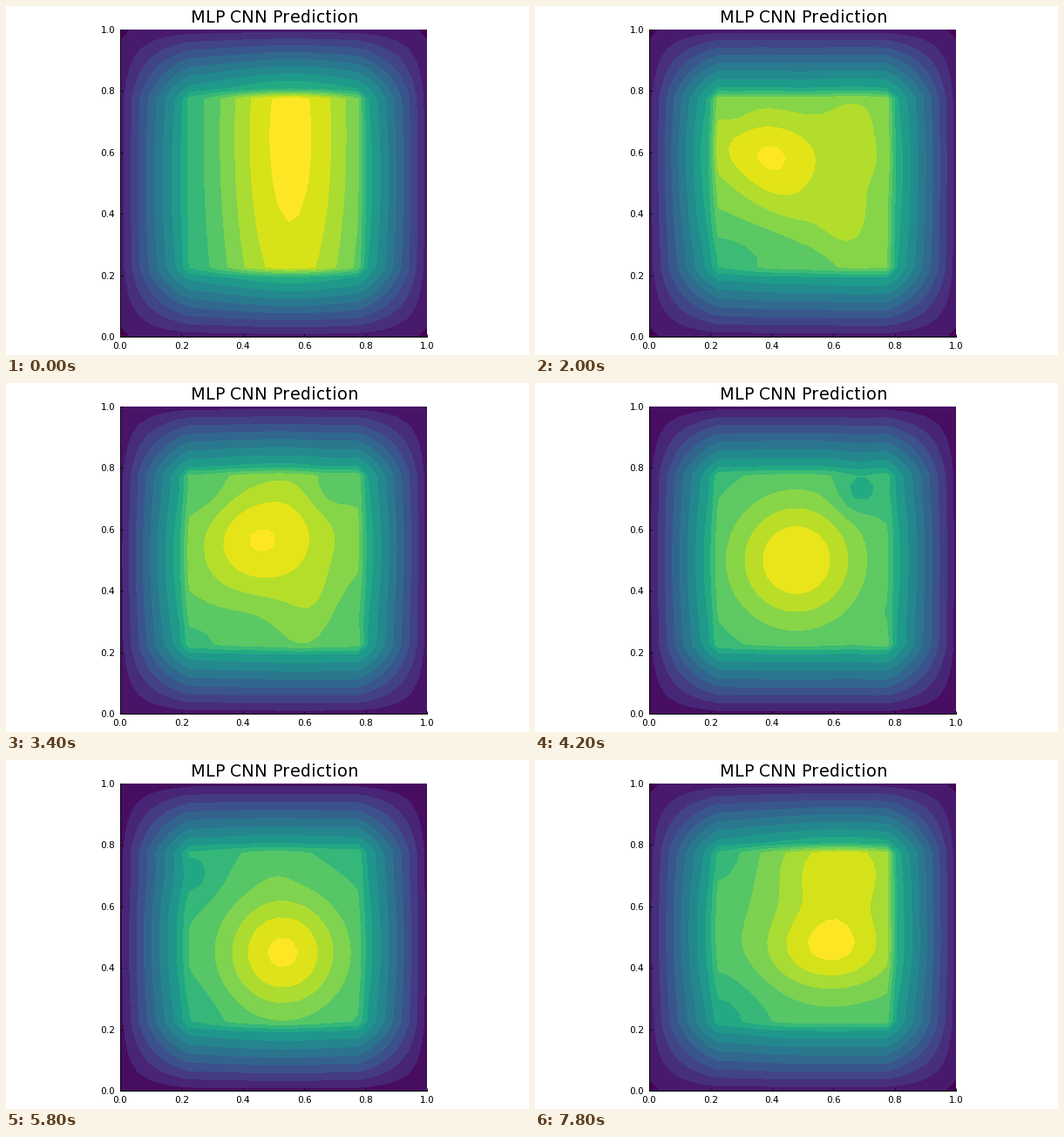
Animation of 600 by 400 pixels, one loop 8000 ms. Source, as a matplotlib script:

```python
import numpy as np
import matplotlib.pyplot as plt
from matplotlib.animation import FuncAnimation

W, H, DPI = 600, 400, 100
FRAMES, STEP = 40, 200
N = 32                 # grid points per side
LO, HI = 7, 24         # inner block where the prediction is strongest

plt.rcParams["font.family"] = "DejaVu Sans"
plt.rcParams["text.hinting_factor"] = 1

idx = np.arange(N)
grid = idx / (N - 1)
inside = (idx >= LO) & (idx <= HI)
block = np.outer(inside, inside)

# outside the block, heights continue from its nearest edge point
edge = grid[np.clip(idx, LO, HI)]
X, Y = np.meshgrid(edge, edge)

# and fall along a ramp to the border, a little fuller halfway up the sides
d = np.minimum(grid, 1 - grid)
ramp = np.where(inside, 1, .07 + 4.9 * d - 3.2 * d**2)
falloff = np.outer(ramp * (1 + .1 * np.sin(np.pi * grid)**2), ramp)


def bump(amp, x, y, rx, ry=None):
    return amp * np.exp(-((X - x) / rx)**2 - ((Y - y) / (ry or rx))**2)


keys = []


def key(frame, peak, low, base, *hills):
    inner = base + sum(hills)
    keys.append((frame, peak, low, inner * peak / inner.max()))


key(0, 14.4, .5, 7.6, bump(6.5, .555, .65, .27, 1.1))
key(6, 14.1, .5, 10.7,
    bump(2.9, .38, .6, .16, .13), bump(2.6, .47, .4, .13),
    bump(1.4, .25, .8, .14), bump(1.6, .68, .74, .12),
    bump(-1.2, .78, .48, .09), bump(-2, .2, .2, .15), bump(-1.1, .58, .24, .1))
key(13, 14.25, .5, 11,
    bump(2.9, .41, .57, .14), bump(1.6, .62, .6, .16),
    bump(2.1, .64, .36, .09, .13), bump(-1.6, .42, .3, .12),
    bump(-2, .22, .22, .12), bump(-1.1, .28, .73, .07))
key(21, 13.97, 0, 9.4,
    bump(4.5, .48, .5, .22), bump(-1.6, .68, .72, .07), bump(.8, .76, .22, .07))
key(29, 14.25, 0, 9.5,
    bump(4.6, .53, .45, .2), bump(-1.2, .23, .7, .08),
    bump(.5, .5, .75, .1), bump(-.8, .22, .24, .1))
key(34, 13.97, 0, 8.7,
    bump(4.2, .6, .42, .22, .17), bump(2.1, .8, .65, .25, .4),
    bump(-1.7, .27, .68, .22), bump(1.5, .55, .8, .13, .06))
key(39, 14.45, .5, 9.9,
    bump(3.3, .62, .72, .22, .17), bump(3.6, .59, .46, .22, .14),
    bump(-1.8, .22, .22, .15), bump(-1.2, .22, .78, .1))


def field(n):
    """Heights over the grid at frame n, with their peak and lowest value."""
    for a, b in zip(keys, keys[1:]):
        if n <= b[0]:
            break
    f = (n - a[0]) / (b[0] - a[0])
    peak, low, inner = ((1 - f) * p + f * q for p, q in zip(a[1:], b[1:]))

    rng = np.random.default_rng(100 + n)
    sway = .6 * np.sin(np.pi * f)
    for _ in range(5):
        x, y = rng.uniform(.2, .8, 2)
        inner = inner + bump(sway * rng.normal(), x, y, .12)

    inner = inner * peak / inner.max()
    outer = (8.2 + .35 * (inner - 9.5)) * falloff - .3 * low
    return np.where(block, inner, outer), peak, low


fig = plt.figure(figsize=(W / DPI, H / DPI), dpi=DPI, facecolor="white")
ax = fig.add_axes([131 / W, 1 - 379 / H, 352 / W, 352 / H])
ax.set(xlim=(0, 1), ylim=(0, 1))
ticks = np.linspace(0, 1, 6)
labels = [f"{t:.1f}" for t in ticks]
ax.set_xticks(ticks, labels)
ax.set_yticks(ticks, labels)
ax.tick_params(direction="in", length=2.2, width=.6, labelsize=8)
ax.tick_params(axis="x", pad=4.6)
ax.tick_params(axis="y", pad=4.2)
for side in ("top", "right"):
    ax.spines[side].set_visible(False)
for side in ("left", "bottom"):
    ax.spines[side].set_linewidth(.72)
fig.text(308.3 / W, 1 - 19 / H, "MLP CNN Prediction", fontsize=14,
         ha="center", va="baseline")

levels = np.arange(-1, 16)
cmap = plt.get_cmap("viridis")
shown = []


def draw(n):
    while shown:
        shown.pop().remove()
    z, peak, low = field(n)
    colors = cmap(np.clip((levels[:-1] + .5 + low) / (peak + low), 0, 1))
    shown.append(ax.contourf(grid, grid, z, levels=levels, colors=colors))
    return shown


anim = FuncAnimation(fig, draw, frames=FRAMES, interval=STEP,
                     init_func=lambda: draw(0), repeat=True, repeat_delay=0,
                     blit=False)
plt.show()
```
